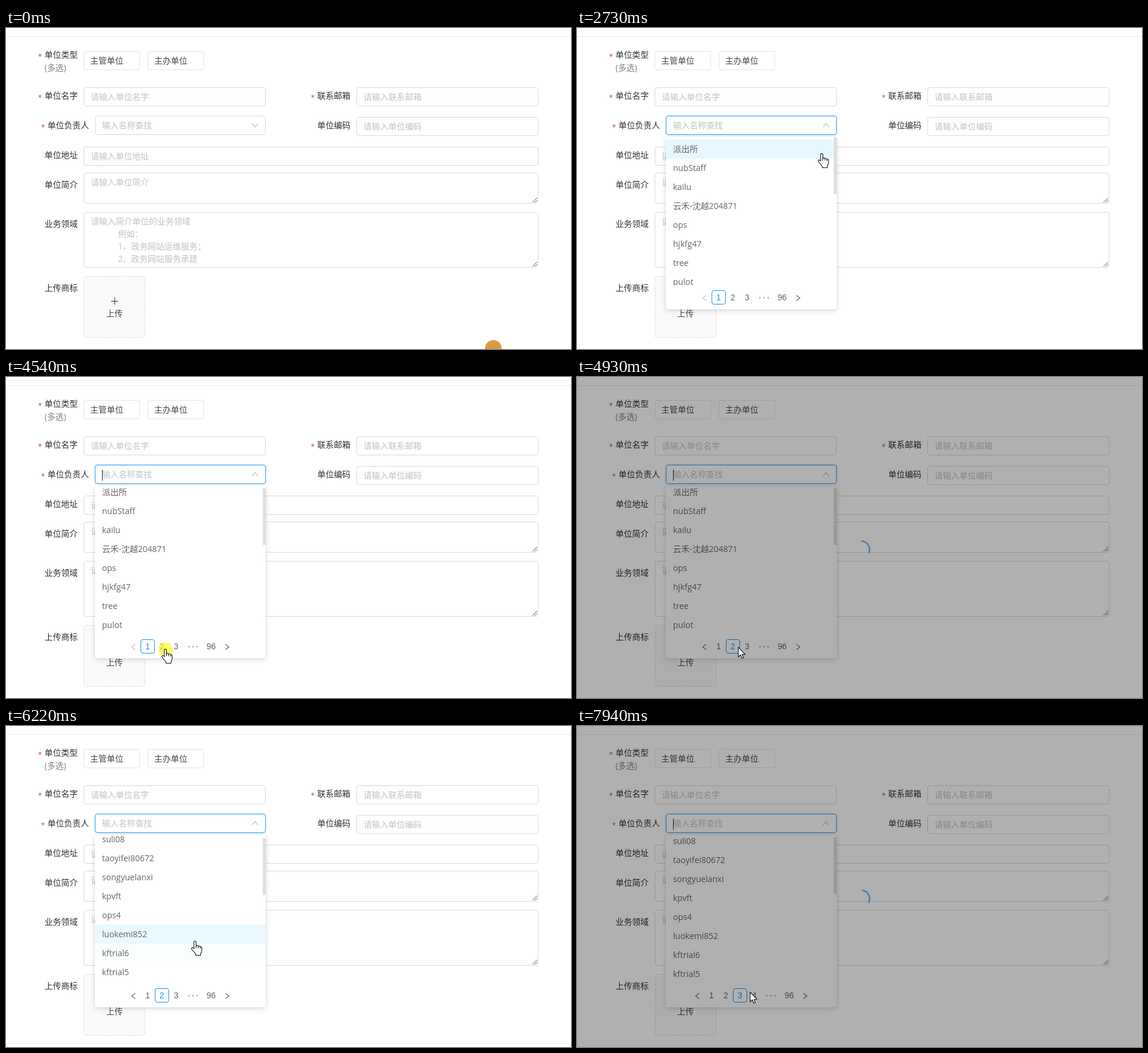
These frames come from a looping animation (953 px wide and 541 px high, 8 s). An HTML page:

```html
<!DOCTYPE html>
<html lang="zh-CN">
<head>
<meta charset="utf-8">
<title>单位信息表单</title>
<style>
html, body { margin: 0; width: 100%; height: 100%; overflow: hidden; background: #fff; }
svg { display: block; width: 100vw; height: 100vh; }
text { font: 14px "Open Sans", "Noto Sans CJK SC", "Noto Sans CJK", sans-serif; white-space: pre; }
.num { font-family: "Liberation Sans", sans-serif; text-anchor: middle; }
.star { font-size: 12px; }
.drop { filter: drop-shadow(0 2px 4px rgba(0, 0, 0, .17)); }
</style>
</head>
<body>
<svg viewBox="0 0 953 541">
  <defs><clipPath id="view"><rect x="150" y="184" width="288" height="250"/></clipPath></defs>
  <g id="form"></g>
  <g id="live"></g>
</svg>
<script>
const LOOP = 8000, BLUE = '#1890ff', HOVER = '#40a9ff', LINE = '#d9d9d9', HINT = '#c2c2c2', INK = '#666';
const OPEN = 1810, LOADED = 5000;

const lists = [
  ['派出所', 'nubStaff', 'kailu', '云禾-沈越204871', 'ops', 'hjkfg47', 'tree', 'pulot', 'nmok31', 'sunyi20', 'kefu03'],
  ['suli08', 'taoyifei80672', 'songyuelanxi', 'kpvft', 'ops4', 'luokemi852', 'kftrial6', 'kftrial5', 'wuyao7', 'pclab2', 'editor9']
];
const fields = [
  [131, 100, 307, 32, '请输入单位名字'],
  [591, 100, 307, 32, '请输入联系邮箱'],
  [591, 150, 307, 32, '请输入单位编码'],
  [131, 200, 767, 32, '请输入单位地址'],
  [131, 244, 767, 52, '请输入单位简介'],
  [131, 310, 767, 94, '请输入简介单位的业务领域']
];
const labels = [
  [65, 45, '单位类型', 1], [65, 114, '单位名字', 1], [525, 114, '联系邮箱', 1], [70, 164, '单位负责人', 1],
  [525, 164, '单位编码'], [65, 214, '单位地址'], [65, 264, '单位简介'], [65, 330, '业务领域'], [65, 438, '上传商标']
];

// Keyframes: time, then values
const cursorKeys = [
  [400, 640, 500], [1180, 423, 160], [1340, 421, 162], [1820, 421, 162], [2260, 413, 212], [2740, 413, 212],
  [3460, 404, 222], [4240, 268, 457], [4310, 269, 459], [4620, 269, 459], [5230, 275, 453], [5380, 275, 453],
  [6130, 319, 363], [7070, 319, 363], [7550, 287, 452], [7780, 287, 452], [7940, 292, 449]
];
const scrollKeys = [
  [2760, 0], [2920, 100], [3300, 100], [3460, 0], [3930, 0], [3931, 10], [LOADED - 1, 10], [LOADED, 4],
  [5620, 4], [5621, 10], [6200, 10], [6390, 110], [6740, 110], [6910, 0], [7290, 0], [7291, 10]
];
const maskKeys = [[4610, 0], [4690, 1], [5090, 1], [5160, 0], [7850, 0], [7930, 1]];

const clamp = v => Math.max(0, Math.min(1, v));
const ramp = (t, start, span) => clamp((t - start) / span);
function at(keys, t) {
  const i = keys.findIndex(k => k[0] > t);
  if (i < 0) return keys[keys.length - 1].slice(1);
  if (i === 0) return keys[0].slice(1);
  const a = keys[i - 1], b = keys[i];
  let p = (t - a[0]) / (b[0] - a[0]);
  p = p * p * (3 - 2 * p);
  return a.slice(1).map((v, j) => v + (b[j + 1] - v) * p);
}

const box = (x, y, w, h, stroke, fill = 'none', r = 3.5, more = '') =>
  `<rect x="${x + .5}" y="${y + .5}" width="${w - 1}" height="${h - 1}" rx="${r}" fill="${fill}" stroke="${stroke}" ${more}/>`;
// y is the middle of the line
const text = (x, y, s, fill, more = '') => `<text x="${x}" y="${y + 5}" fill="${fill}" ${more}>${s}</text>`;
const path = (d, stroke, more = 'fill="none"') => `<path d="${d}" stroke="${stroke}" ${more}/>`;

function drawForm() {
  let s = '<rect y="14" width="953" height="1" fill="#e8e8e8"/>';
  for (const [x, y, name, must] of labels) {
    s += text(x, y, name, '#303030');
    if (must) s += text(x - 11, y + 3, '*', '#c0553a', 'class="star"');
  }
  s += text(65, 67, '(多选)', '#808080');
  s += box(131, 39, 95, 32, '#e4e4e4', '#fff', 2) + text(142, 55, '主管单位', '#484848');
  s += box(239, 39, 95, 32, '#e4e4e4', '#fff', 2) + text(250, 55, '主办单位', '#484848');
  for (const [x, y, w, h, hint] of fields) {
    s += box(x, y, w, h, LINE) + text(x + 12, y + 16, hint, HINT);
    if (h > 32) s += path(`M${x + w - 10} ${y + h - 2}l8-8m-4 8l4-4`, '#555');
  }
  ['例如：', '1、政务网站运维服务；', '2、政务网站服务承建'].forEach((line, i) => s += text(189, 347 + 21 * i, line, HINT));
  s += box(131, 418, 104, 104, LINE, '#fafafa', 3.5, 'stroke-dasharray="3 2"');
  s += path('M177 460.5h12M183.5 454v12', '#333') + text(169, 481, '上传', '#484848');
  return s;
}

function rowAt(t) {
  const [x, y] = at(cursorKeys, t), [scroll] = at(scrollKeys, t);
  if (t < 2260 && y < 184) return 0;
  // Hover is only renewed once the wheel has come to rest
  if (Math.abs(scroll - at(scrollKeys, t - 100)[0]) > 12) return -1;
  if (y >= 184 && y < 434 && x > 150 && x < 438) return Math.max(0, Math.floor((y - 188 + scroll) / 32));
  return t >= LOADED && t < 6000 ? 0 : -1;
}

function drawPager(page) {
  const wide = page === 3, left = wide ? 203 : 215;
  const arrow = (x, d, c) => path(`M${x - 3 * d} 450.5l${6 * d} 4.5l${-6 * d} 4.5`, c, 'fill="none" stroke-width="1.2"');
  let x = left, s = arrow(x, -1, page === 1 ? HINT : INK);
  for (let n = 1; n <= (wide ? 4 : 3); n++) {
    x += 24;
    if (n === page) s += box(x - 12, 442, 24, 24, BLUE, '#fff');
    s += text(x, 454, n, n === page ? BLUE : INK, 'class="num"');
  }
  for (let i = 0; i < 3; i++) s += `<circle cx="${x + 21.5 + 7 * i}" cy="454.5" r="1.7" fill="${HINT}"/>`;
  return s + text(x + 59, 454, 96, INK, 'class="num"') + arrow(x + 86, 1, INK);
}

function drawDrop(t, page) {
  const p = ramp(t, OPEN, 200), e = 1 - (1 - p) ** 3, [scroll] = at(scrollKeys, t);
  let rows = '';
  // Row tint follows the pointer with a 300 ms fade
  const tint = {};
  for (let k = 0; k < 6; k++) {
    const r = rowAt(t - 50 * k);
    tint[r] = (tint[r] || 0) + 1 / 6;
  }
  lists[t < LOADED ? 0 : 1].forEach((name, i) => {
    const y = 188 + 32 * i - scroll;
    if (tint[i]) rows += `<rect x="150" y="${y}" width="288" height="32" fill="#e6f7ff" opacity="${tint[i]}"/>`;
    rows += text(162, y + 16, name, INK);
  });
  const move = p < 1 ? `transform="translate(0 184) scale(1 ${.8 + .2 * e}) translate(0 -184)" opacity="${e}"` : '';
  return `<g ${move}><rect class="drop" x="150" y="184" width="288" height="290" rx="4" fill="#fff"/>
    <g clip-path="url(#view)">${rows}</g>
    <rect x="433" y="${184 + Math.floor(scroll * .39)}" width="5" height="96" fill="#dedede"/>${drawPager(page)}</g>`;
}

function caretOn(t) {
  const start = t < 4620 ? 1950 : 4620;
  return t >= OPEN && (t < start || Math.floor((t - start) / 530) % 2 === 0);
}

function drawSelect(t) {
  const open = t >= OPEN, turn = 180 * ramp(t, OPEN, 300);
  const edge = t < 1100 ? LINE : t < 1260 ? '#b4c8d8' : HOVER;
  let s = open ? box(149, 147, 290, 34, 'rgba(24,144,255,.2)', 'none', 5, 'stroke-width="2"') : '';
  s += box(150, 148, 288, 32, edge, '#fff') + text(162, 164, '输入名称查找', HINT);
  s += path('M-5-3L0 3L5-3', HINT, `fill="none" stroke-width="1.2" transform="translate(420 164) rotate(${turn})"`);
  if (caretOn(t)) s += '<rect x="162" y="156" width="1" height="19" fill="#222"/>';
  return s;
}

const shapes = {
  arrow: 'M0 0V16.5L3.8 13 6.3 18.7 8.8 17.6 6.4 12.2H11.5Z',
  hand: 'M-2 13V1.8a1.8 1.8 0 0 1 3.6 0V8c.5-1 3.2-1 3.7.7c.8-.8 3-.5 3.3 1c1-.6 2.6-.1 2.6 1.6V16c0 3-2 4-2 6.5V24H1v-1.5C0 20-4 16.5-5.8 13.5c-1.2-2 1.3-3.6 2.6-2zM1.6 8v4M5.3 9v3M8.6 10v2.5',
  beam: 'M-3-8h2.5l.5.5.5-.5H3M0-7.5v15M-3 8h2.5l.5-.5.5.5H3'
};
const inside = ([x, y, w, h], px, py) => px >= x && px < x + w && py >= y && py < y + h;

function drawCursor(t, mask) {
  if (t < 400) return '';
  const [x, y] = at(cursorKeys, t);
  const field = t < OPEN && fields.find(f => inside(f, x, y));
  let s = field ? box(...field.slice(0, 4), HOVER) : '';
  if ([1730, 4540, 7780].some(c => t >= c && t < c + 75))
    s += `<circle cx="${x}" cy="${y}" r="12" fill="#ff0" opacity=".6"/>`;
  const kind = mask ? 'arrow' : field ? 'beam' : inside([150, 148, 288, 326], x, y) ? 'hand' : 'arrow';
  return s + path(shapes[kind], '#111', `fill="#fff" stroke-width="1.1" stroke-linejoin="round" transform="translate(${x} ${y - .5})"`);
}

// The spinner lies beneath the shade
function drawMask(t, alpha) {
  if (!alpha) return '';
  const turn = (t - 7940) * .36;
  return path('M2.5-14.3A14.5 14.5 0 0 1 13.1 6.2', '#6cb4f8',
    `fill="none" stroke-width="2.5" stroke-linecap="round" opacity="${alpha}" transform="translate(479 291) rotate(${turn})"`) +
    `<rect width="953" height="541" opacity="${.31 * alpha}"/>`;
}

const live = document.getElementById('live');
document.getElementById('form').innerHTML = drawForm();

function render(t) {
  const page = t < 4620 ? 1 : t < 7860 ? 2 : 3, [mask] = at(maskKeys, t);
  live.innerHTML = (t < 2000 ? '<circle cx="822" cy="540" r="14" fill="#dc9a42"/>' : '') +
    drawSelect(t) + (t >= OPEN ? drawDrop(t, page) : '') + drawMask(t, mask) + drawCursor(t, mask);
}

const begin = performance.now();
function tick() {
  render((performance.now() - begin) % LOOP);
  requestAnimationFrame(tick);
}
tick();
</script>
</body>
</html>
```
